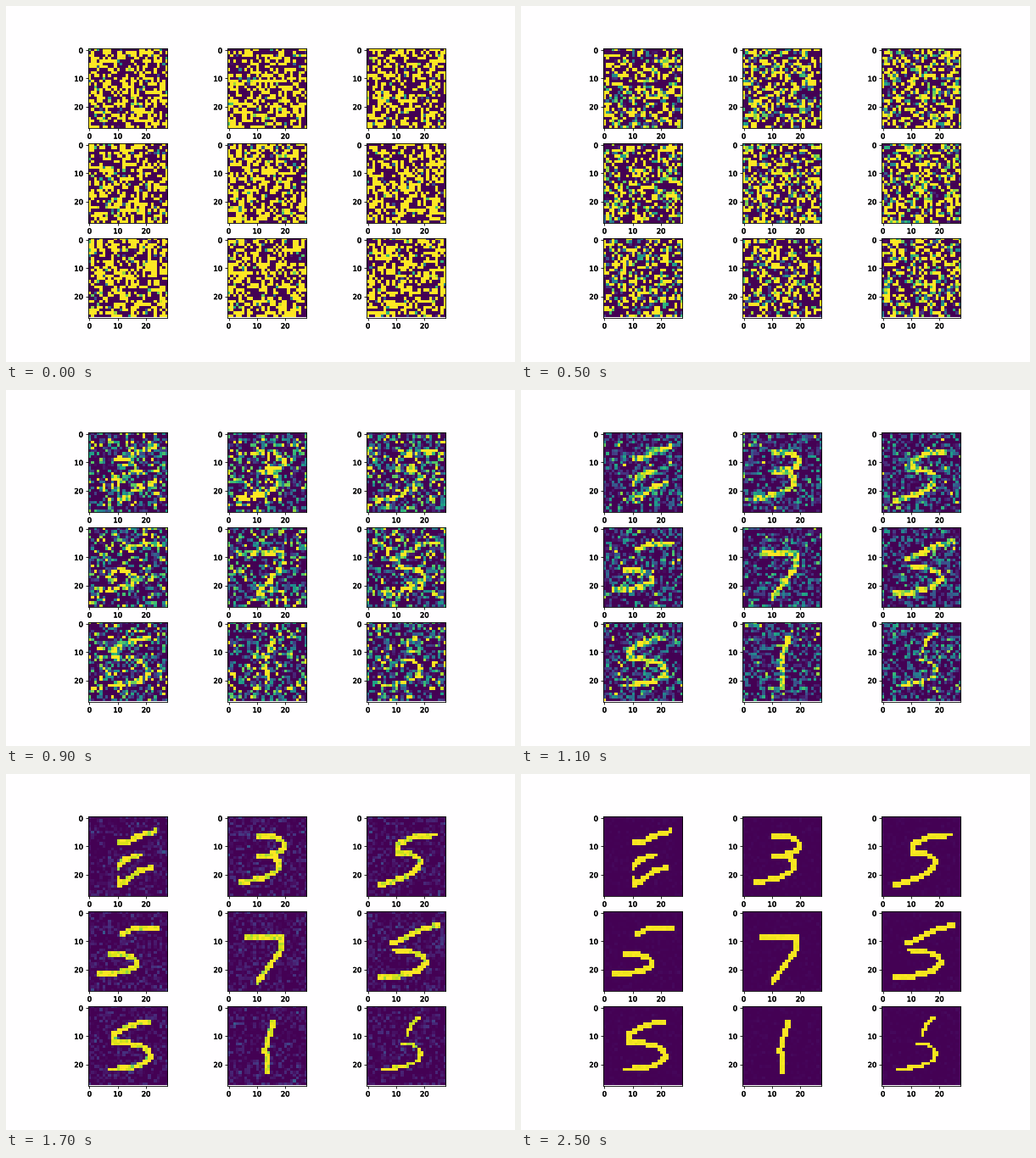
A matplotlib script that plays this animation: 600x420 px, repeating every 2600 ms.

```python
import numpy as np
import matplotlib.pyplot as plt
from matplotlib.animation import FuncAnimation
from matplotlib.patheffects import withStroke

FRAMES, STEP_MS = 26, 100
GRID = 28
SIGMA_START, SIGMA_END = 6, 0.01
THICK, THIN = 0.95, 0.6

plt.rcParams.update({
    "font.family": "DejaVu Sans", "font.size": 6, "axes.linewidth": 0.6,
    "xtick.major.size": 2.1, "ytick.major.size": 2.1,
    "xtick.major.pad": 2.1, "ytick.major.pad": 2.1,
    "xtick.major.width": 0.6, "ytick.major.width": 0.6,
})


def bowl(start, belly, end, lift=0):
    """Cubic curve from start to end whose right side reaches x = belly."""
    reach = (belly - (start[0] + end[0]) / 8) / 0.75
    points = np.array([start, (reach, start[1]), (reach, end[1] - lift), end])
    t = np.linspace(0, 1, 25)[:, None]
    weights = np.hstack([(1 - t)**3, 3 * t * (1 - t)**2, 3 * t**2 * (1 - t), t**3])
    return list(map(tuple, weights @ points))


def five(flag, waist, belly, tail, lift=0, joined=False):
    stem = [[flag[-1], waist]] if joined else []
    return [flag, *stem, bowl(waist, belly, tail, lift)]


def rasterize(strokes, radius=THICK):
    y, x = np.mgrid[:GRID, :GRID] + 0.5
    mask = np.zeros((GRID, GRID))
    for path in strokes:
        for (x0, y0), (x1, y1) in zip(path, path[1:]):
            dx, dy = x1 - x0, y1 - y0
            t = np.clip(((x - x0) * dx + (y - y0) * dy) / (dx**2 + dy**2), 0, 1)
            mask[np.hypot(x - x0 - t * dx, y - y0 - t * dy) < radius] = 1
    return mask


# Strokes in grid cells, x to the right and y down.
digits = [
    rasterize([[(10.5, 9.3), (14, 9), (18, 6.7), (23.3, 5.4)],
               [(10.6, 17.6), (13, 15), (18, 13.6)],
               [(10.6, 22.4), (11.3, 24), (18.3, 19), (22, 18.2)]]),
    rasterize([bowl((11, 6.7), 20, (10.5, 13.8)),
               bowl((10.5, 13.8), 18.4, (5.3, 23), lift=2)]),
    rasterize(five([(24, 6.5), (18, 6.9), (11, 9.6)], (11, 12.8), 18.6, (4.7, 24),
                   lift=4, joined=True)),
    rasterize(five([(24, 6), (16, 6), (11.7, 8)], (7.5, 15), 17, (3.5, 22))),
    rasterize([[(6.5, 8.9), (19.5, 8.7), (18.6, 14), (10.4, 25)]]),
    rasterize(five([(25, 5), (19, 6.5), (9, 11.3)], (10.4, 13.8), 20.6, (4.6, 23))),
    rasterize(five([(21.5, 5.6), (15.5, 6.8), (9, 10)], (9, 13), 21.7, (7.7, 22.5),
                   joined=True)),
    rasterize([[(16.2, 5.6), (14, 13), (13, 16.3), (14, 17), (14, 23.2)]]),
    rasterize(five([(18, 4.4), (16, 6.4), (14.3, 10)], (12.5, 13.5), 19, (5.4, 22.3)),
              radius=THIN),
]

fig, axes = plt.subplots(3, 3, figsize=(6, 4.2), dpi=100, facecolor="#fffeff")
fig.subplots_adjust(left=0.125, right=0.9, bottom=0.125, top=0.88,
                    wspace=0.2, hspace=0.2)
images = []
for ax in axes.flat:
    images.append(ax.imshow(np.zeros((GRID, GRID)), cmap="viridis", vmin=0, vmax=1,
                            interpolation="nearest"))
    ax.set(xticks=range(0, GRID, 10), yticks=range(0, GRID, 10))
    for label in ax.get_xticklabels() + ax.get_yticklabels():
        label.set_path_effects([withStroke(linewidth=0.35, foreground="black")])


def update(frame):
    rng = np.random.default_rng(frame)
    sigma = SIGMA_START * (SIGMA_END / SIGMA_START) ** (frame / (FRAMES - 1))
    strength = 0.985 / (1 + sigma**4)
    for image, digit in zip(images, digits):
        image.set_data(strength * digit + sigma * rng.standard_normal(digit.shape))
    return images


anim = FuncAnimation(fig, update, frames=FRAMES, interval=STEP_MS,
                     repeat=True, repeat_delay=0, blit=False)
plt.show()
```
